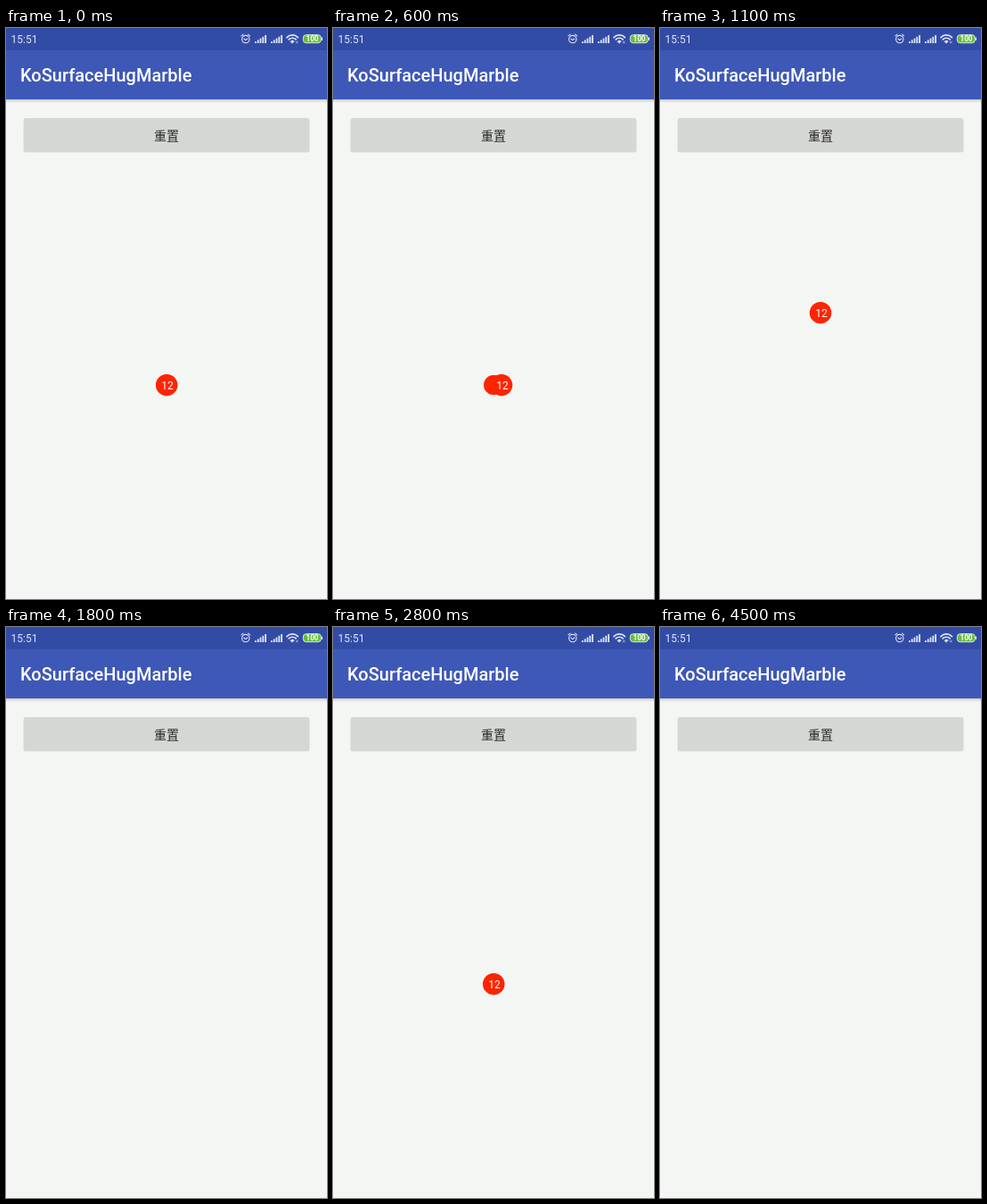
An HTML page that plays this animation: 360x640 px, repeating every 4.6 s.

```html
<!DOCTYPE html>
<html lang="zh-CN">
<head>
<meta charset="utf-8">
<title>Drag bubble</title>
<style>
  html, body { margin: 0; width: 100%; height: 100%; overflow: hidden; background: #f4f6f3; }
  svg { display: block; }
  text { font-family: Roboto, "Noto Sans CJK SC", "Noto Sans CJK", sans-serif; }
</style>
</head>
<body>
<svg width="360" height="640" viewBox="0 0 360 640">
  <defs>
    <linearGradient id="shade" x2="0" y2="1">
      <stop stop-color="#000" stop-opacity=".17"/>
      <stop offset="1" stop-color="#000" stop-opacity="0"/>
    </linearGradient>
    <clipPath id="btnClip"><rect x="20" y="101" width="320" height="37.5" rx="2"/></clipPath>
  </defs>

  <rect width="360" height="640" fill="#f4f6f3"/>
  <rect y="80" width="360" height="4" fill="url(#shade)"/>
  <rect width="360" height="80" fill="#3e58b7"/>
  <rect width="360" height="25" fill="#324ca6"/>

  <text x="5.5" y="17" font-size="12" fill="#dfe5f5">15:51</text>
  <g fill="none" stroke="#dfe5f5" stroke-width="1.1" stroke-linecap="round">
    <circle cx="268.8" cy="12.6" r="4.2"/>
    <path d="M266.8 12l2 1.6 2-1.6M264 8.8l2-1.7M273.6 8.8l-2-1.7"/>
    <path d="M315 10.6a8.6 8.6 0 0 1 12.4 0M317.2 12.9a5.7 5.7 0 0 1 8 0" stroke-width="1.7"/>
    <path d="M319.2 15a2.8 2.8 0 0 1 4 0L321.2 17z" fill="#dfe5f5" stroke-width=".8"/>
    <path d="M325.4 15l1.8 2M327.2 15l-1.8 2" stroke-width=".6"/>
  </g>
  <g id="signal" fill="#dfe5f5"></g>
  <rect x="333.3" y="7.7" width="20" height="9" rx="3.4" fill="#63bd3a" stroke="#e4ecdf"/>
  <rect x="353.6" y="10.5" width="1.4" height="3.4" rx=".6" fill="#e4ecdf"/>
  <text x="343.5" y="15.1" font-size="8.2" font-weight="700" fill="#fff" text-anchor="middle">100</text>

  <text x="16" y="59.8" font-size="20" font-weight="500" fill="#fff">KoSurfaceHugMarble</text>

  <rect x="19.5" y="101.5" width="321" height="38" rx="2.5" fill="#000" opacity=".1"/>
  <rect x="20" y="101" width="320" height="37.5" rx="2" fill="#d5d7d4"/>
  <g clip-path="url(#btnClip)"><circle id="ripple" cx="252" cy="120"/></g>
  <text x="180" y="126" font-size="14" fill="#272827" text-anchor="middle">重置</text>

  <g id="bubble" fill="#fd2403">
    <circle id="anchor"/>
    <path id="bridge"/>
    <g id="ball">
      <circle id="disc"/>
      <text x=".9" y="4.4" font-size="12" fill="#fff" text-anchor="middle">12</text>
    </g>
  </g>
  <g id="burst" fill="#cdd2da" stroke="#aeb5c0" stroke-width=".6"></g>
</svg>
<script>
const LOOP = 4600, STEP = 100;
const HOME = { x: 180.2, y: 400.2 }, R = 12.25, SNAP = 72;
const $ = id => document.getElementById(id);
const NS = 'http://www.w3.org/2000/svg';

// keys: [time, x, y]; each drag ends in a burst that lasts until `gone`
const drags = [
  { from: 0, pop: 1400, gone: 1800, keys: [
    [0, HOME.x, HOME.y], [400, HOME.x, HOME.y], [600, 189, 400.2], [700, 200, 388], [800, 208, 370],
    [900, 208, 352], [1000, 198, 334], [1100, 180, 319.2], [1200, 172, 303], [1300, 176, 296]] },
  { from: 2300, pop: 3600, gone: 4000, keys: [
    [2300, HOME.x, HOME.y], [3100, HOME.x, HOME.y], [3200, 172, 411], [3300, 152, 437],
    [3400, 125, 477], [3500, 104, 509.7]] }
];

function set(el, attrs) {
  for (const k in attrs) el.setAttribute(k, attrs[k]);
}

function add(parent, tag, attrs) {
  const el = document.createElementNS(NS, tag);
  set(el, attrs);
  return parent.appendChild(el);
}

function show(el, on) {
  el.style.display = on ? '' : 'none';
}

for (const x of [279, 297]) {
  for (let i = 0; i < 5; i++) {
    const h = 1.8 + i * 1.8;
    add($('signal'), 'rect', { x: x + i * 2.8, y: 17 - h, width: 1.8, height: h });
  }
}

set($('disc'), { r: R });
set($('anchor'), { cx: HOME.x, cy: HOME.y });
const puffs = Array.from({ length: 7 }, () => add($('burst'), 'circle', {}));

function posAt(keys, t) {
  let i = keys.findIndex(k => k[0] > t);
  if (i < 0) i = keys.length;
  const a = keys[i - 1], b = keys[i] || a;
  const p = a === b ? 0 : (t - a[0]) / (b[0] - a[0]);
  return { x: a[1] + (b[1] - a[1]) * p, y: a[2] + (b[2] - a[2]) * p };
}

function drawBubble(p) {
  const dx = p.x - HOME.x, dy = p.y - HOME.y, d = Math.hypot(dx, dy);
  set($('ball'), { transform: `translate(${p.x} ${p.y})` });
  const linked = d > 0 && d < SNAP;
  show($('anchor'), linked);
  show($('bridge'), linked);
  if (!linked) return;
  const r = R - d / 8, nx = -dy / d, ny = dx / d;
  const edge = (c, s) => `${c.x + nx * s} ${c.y + ny * s}`;
  const mid = `${HOME.x + dx / 2} ${HOME.y + dy / 2}`;
  set($('anchor'), { r });
  set($('bridge'), {
    d: `M${edge(HOME, r)}Q${mid} ${edge(p, R)}L${edge(p, -R)}Q${mid} ${edge(HOME, -r)}Z`
  });
}

function drawBurst(p, q) {
  puffs.forEach((el, i) => {
    const a = i * 2.4, far = (3 + 6 * q) * (i % 2 ? 1 : .75);
    set(el, { cx: p.x + Math.cos(a) * far, cy: p.y + 1 + Math.sin(a) * far,
      r: 4.6 - 4 * q, opacity: 1 - q * .5 });
  });
}

function drawRipple(t) {
  const q = (t - 2200) / 600, on = q >= 0 && q < 1;
  set($('ripple'), { r: on ? 60 + 260 * q : 0, opacity: on ? .14 * (1 - q) : 0 });
}

function draw(t) {
  const drag = drags.find(d => t >= d.from && t < d.gone);
  const popped = drag && t >= drag.pop;
  show($('bubble'), drag && !popped);
  show($('burst'), popped);
  if (drag) {
    const p = posAt(drag.keys, t);
    if (popped) drawBurst(p, (t - drag.pop) / (drag.gone - drag.pop));
    else drawBubble(p);
  }
  drawRipple(t);
}

// the picture advances in 100 ms steps
function tick(now) {
  draw(Math.floor((now % LOOP) / STEP) * STEP);
  requestAnimationFrame(tick);
}
draw(0);
requestAnimationFrame(tick);
</script>
</body>
</html>
```
